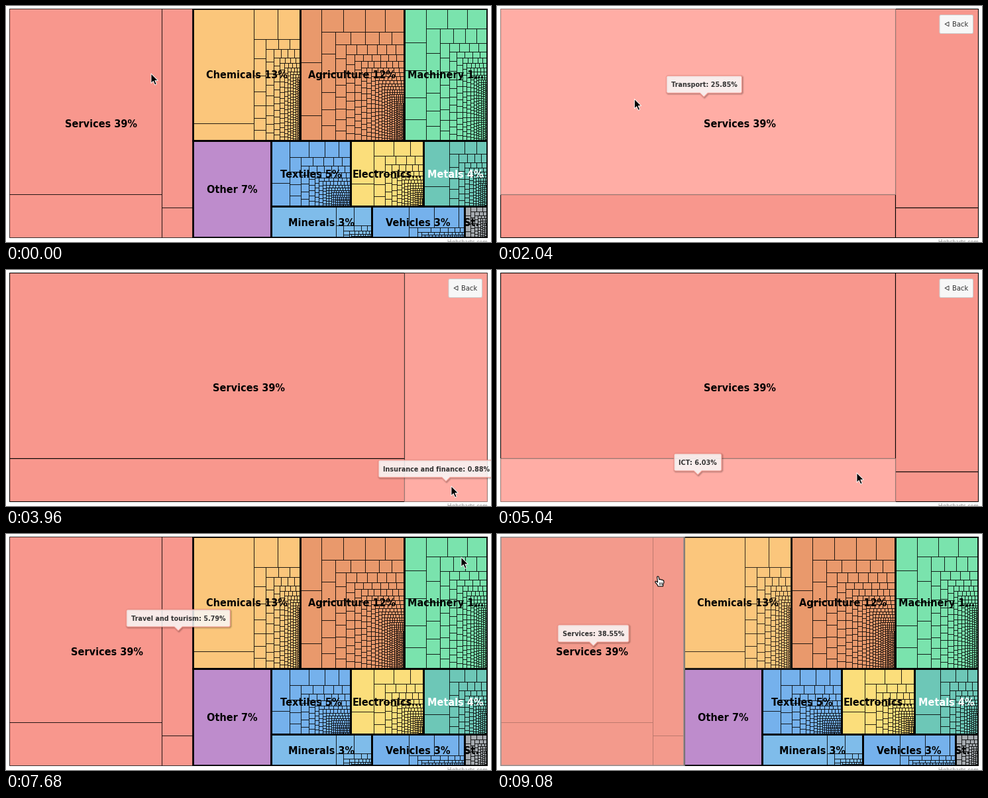
A matplotlib script that plays this animation: 732 px wide and 356 px high, repeating every 9120 ms.

```python
import matplotlib.pyplot as plt
from matplotlib.animation import FuncAnimation
from matplotlib.collections import PolyCollection
from matplotlib.patches import FancyBboxPatch, Polygon, Rectangle

W, H, DPI = 732, 356, 100
STEP, LOOP = 40, 9120
PX = 72 / DPI
DRILL_IN, DRILL_OUT, HOVER_START = 960, 7240, 160
FADE = 600
MIN_AREA = 6

fig = plt.figure(figsize=(W / DPI, H / DPI), dpi=DPI, facecolor="white")
ax = fig.add_axes([0, 0, 1, 1])
ax.set_xlim(0, W)
ax.set_ylim(H, 0)
ax.axis("off")
frame = Rectangle((5, 4), 722, 346, transform=ax.transData)


def rgb(r, g, b):
    return (r / 255, g / 255, b / 255)


def mix(a, b, k):
    return tuple(p + (q - p) * k for p, q in zip(a, b))


def ease(u):
    u = min(max(u, 0), 1)
    return u * u * (3 - 2 * u)


def label(x, y, text, size, color="black", weight="bold", ha="center", z=20):
    return ax.text(x, y, text, fontsize=size * PX, family="DejaVu Sans",
                   color=color, weight=weight, ha=ha, va="baseline", zorder=z)


def power_tail(first, spread):
    values = [first]
    while values[-1] > MIN_AREA:
        values.append(first * (1 + len(values) / spread) ** -1.5)
    return values


def tail_filling(area, first):
    low, high = .1, 100
    for _ in range(30):
        spread = (low + high) / 2
        if sum(power_tail(first, spread)) < area:
            low = spread
        else:
            high = spread
    values = power_tail(first, low)
    scale = area / sum(values)
    return [v * scale for v in values]


def last_ratio(strip, total, length):
    thick = total / length
    size = strip[-1] / thick
    return max(thick / size, size / thick)


def treemap(x, y, w, h, heads, first):
    """Squarified layout: strips alternate in direction and take cells until
    the latest one would get a worse aspect ratio."""
    queue = list(heads) + tail_filling(w * h - sum(heads), first)
    cells, column = [], True
    while queue:
        length = h if column else w
        strip = [queue.pop(0)]
        while queue and (last_ratio(strip, sum(strip) + queue[0], length)
                         <= last_ratio(strip, sum(strip), length)):
            strip.append(queue.pop(0))
        thick, pos = sum(strip) / length, 0
        for v in strip:
            size = v / thick
            cells.append((x, y + pos, thick, size) if column
                         else (x + pos, y, size, thick))
            pos += size
        if column:
            x, w = x + thick, w - thick
        else:
            y, h = y + thick, h - thick
        column = not column
    return cells


def corners(x, y, w, h):
    return [(x, y), (x + w, y), (x + w, y + h), (x, y + h)]


SALMON = rgb(248, 151, 141)
SALMON_HOVER = rgb(255, 173, 165)
BLUE = rgb(117, 177, 236)

# name: rectangle, colour, largest areas, first tail area, label, label y
GROUPS = {
    "Services": ((5, 4, 277, 345), SALMON, None, 0, "", 177),
    "Chemicals": ((282, 4, 162, 199), rgb(251, 198, 123),
                  (15900, 2400, 1660, 1570), 540, "Chemicals 13%", 103),
    "Agriculture": ((444, 4, 157, 199), rgb(233, 153, 108),
                    (2640, 2600, 1220, 1150, 1150, 1030, 1020), 680,
                    "Agriculture 12%", 103),
    "Machinery": ((601, 4, 125, 199), rgb(122, 227, 173),
                  (1680, 1430, 1350, 1100, 1060, 950, 930, 910), 760,
                  "Machinery 1…", 103),
    "Other": ((282, 203, 118, 146), rgb(190, 140, 204), None, 0,
              "Other 7%", 276),
    "Textiles": ((400, 203, 120, 99), BLUE, (1790, 960), 720,
                 "Textiles 5%", 253),
    "Electronics": ((520, 203, 110, 99), rgb(251, 222, 123),
                    (2270, 1165), 700, "Electronics…", 253),
    "Metals": ((630, 203, 96, 99), rgb(109, 199, 183), (2740, 1170),
               450, "Metals 4%", 253),
    "Minerals": ((400, 302, 152, 47), rgb(127, 188, 234),
                 (4600, 790, 770), 200, "Minerals 3%", 326),
    "Vehicles": ((552, 302, 140, 47), BLUE, (2650, 1200, 1150), 300,
                 "Vehicles 3%", 326),
    "Stone": ((692, 302, 34, 47), rgb(165, 170, 175), (), 130,
              "St.", 326),
}
SERVICE_CELLS = [(5, 4, 230, 280), (5, 284, 230, 65),
                 (235, 4, 47, 300), (235, 304, 47, 45)]

# Overview
polys, fills, overview, overlays = [], [], [], {}
for name, (rect, color, heads, first, text, ty) in GROUPS.items():
    if name == "Services":
        cells = SERVICE_CELLS
    else:
        cells = [rect] if heads is None else treemap(*rect, heads, first)
    polys += [corners(*c) for c in cells]
    fills += [color] * len(cells)
    x, y, w, h = rect
    if name != "Services":
        border = ax.add_patch(Rectangle((x, y), w, h, fill=False, ec="black",
                                        lw=2.7 * PX, zorder=3))
        border.set_clip_path(frame)
        tx = 703 if name == "Stone" else x + w / 2
        overview += [border, label(tx, ty + 6.2, text, 14.5,
                                   "white" if name == "Metals" else "black")]
    glow = rgb(242, 156, 140) if name == "Services" else mix(color, (1, 1, 1), .1)
    overlay = ax.add_patch(Rectangle((x, y), w, h, fc=glow, ec=rgb(153, 153, 153),
                                     lw=2.7 * PX, zorder=4))
    overlay.set_clip_path(frame)
    overlays[name] = overlay
small_cells = ax.add_collection(PolyCollection(
    polys, facecolors=fills, edgecolors=(0, 0, 0, .8), linewidths=.95 * PX, zorder=2))
small_cells.set_clip_path(frame)
overview.append(small_cells)

# Drilled view
DETAIL = {
    "Transport": (5, 4, 596, 280),
    "ICT": (5, 284, 596, 65),
    "Travel": (601, 4, 125, 300),
    "Insurance": (601, 304, 125, 45),
}
detail = {}
for name, (x, y, w, h) in DETAIL.items():
    detail[name] = ax.add_patch(Rectangle((x, y), w, h, lw=1.1 * PX))
    detail[name].set_clip_path(frame)
button = [
    ax.add_patch(FancyBboxPatch((669.5, 15), 47.5, 25, boxstyle="round,pad=1.5,rounding_size=2",
                                fc=rgb(247, 247, 247), ec=rgb(205, 205, 205),
                                lw=PX, zorder=22)),
    ax.add_patch(Polygon([(676, 27.3), (682, 24), (682, 30.6)], fill=False,
                         ec=rgb(51, 51, 51), lw=.9 * PX, zorder=23)),
    label(686.5, 31, "Back", 10, rgb(51, 51, 51), "normal", "left", 23),
]
services_label = label(143.5, 183.2, "Services 39%", 14.5)
label(727, 359, "Highcharts.com", 7.9, rgb(144, 144, 144), "normal", "right")

# Tooltip
TIPS = {
    "Services": "Services: 38.55%", "Transport": "Transport: 25.85%",
    "Travel": "Travel and tourism: 5.79%", "ICT": "ICT: 6.03%",
    "Insurance": "Insurance and finance: 0.88%",
    "Machinery": "Machinery: 10.05%", "Agriculture": "Agriculture: 12.46%",
    "Chemicals": "Chemicals: 12.83%",
}
# time, hovered area, tooltip subject, anchor
EVENTS = [
    (HOVER_START, "Services", "Services", 145, 177),
    (DRILL_IN, None, "Services", 366, 177),
    (1920, "Transport", "Transport", 303, 144),
    (2555, "Travel", "Travel", 664, 154),
    (3640, "Insurance", "Insurance", 664, 327),
    (4373, "ICT", "ICT", 303, 317),
    (5570, "Transport", "Transport", 303, 144),
    (5832, "Travel", "Travel", 664, 154),
    (DRILL_OUT, None, "Travel", 259, 154),
    (8160, "Machinery", "Machinery", 664, 103),
    (8310, "Agriculture", "Agriculture", 523, 103),
    (8444, "Chemicals", "Chemicals", 364, 103),
    (8612, "Services", "Services", 145, 177),
]
tip_text = label(0, 0, "", 9.7, rgb(51, 51, 51), ha="left", z=33)
tip_width = {}
for name, text in TIPS.items():
    tip_text.set_text(text)
    tip_width[name] = tip_text.get_window_extent().width + 14
tip_shadows = [ax.add_patch(Polygon([(0, 0)] * 3, fill=False, ec=(0, 0, 0, a), lw=w * PX,
                                    joinstyle="round", zorder=30))
               for w, a in ((5, .05), (3, .1), (1, .15))]
tip_box = ax.add_patch(Polygon([(0, 0)] * 3, fc=rgb(249, 249, 249) + (.85,), lw=PX,
                               joinstyle="round", zorder=31))


def tip_outline(left, top, w, anchor):
    right, bottom, c = left + w, top + 26, 1.5
    a = min(max(anchor, left + 9), right - 9)
    return [(left + c, top), (right - c, top), (right, top + c), (right, bottom - c),
            (right - c, bottom), (a + 6, bottom), (a, bottom + 6), (a - 6, bottom),
            (left + c, bottom), (left, bottom - c), (left, top + c)]


def tip_state(t):
    """Chase each target: a third of the way in x, half in y, every 32 ms."""
    pos = None
    for i, (start, _, subject, ax_, ay) in enumerate(EVENTS):
        if t < start:
            break
        end = min(t, EVENTS[i + 1][0]) if i + 1 < len(EVENTS) else t
        w = tip_width[subject]
        goal = (min(ax_ - w / 2, 737 - w), ay, ax_)
        n = 1 + (end - start) / 32
        rates = ((2 / 3) ** n, .5 ** n, (2 / 3) ** n)
        pos = goal if pos is None else tuple(
            g + (p - g) * r for p, g, r in zip(pos, goal, rates))
        shown = subject
    return shown, pos


def hover_level(name, t):
    level = 0
    for i, event in enumerate(EVENTS):
        if event[1] == name and t >= event[0]:
            end = EVENTS[i + 1][0] if i + 1 < len(EVENTS) else LOOP
            level = 1 if t < end else 1 - ease((t - end) / FADE)
    return level


# Cursor
ARROW = [(0, 0), (0, 14.5), (3.3, 11.4), (5.8, 17), (8.2, 15.9), (5.8, 10.5), (10.3, 10.3)]
HAND = [(-1.6, .6), (-.4, 0), (.8, .6), (1.8, 5), (3.5, 4.4), (4.6, 5.4), (6.2, 5),
        (7.2, 6.2), (8.4, 6.2), (8.8, 9), (7.4, 12.6), (7.4, 15), (-.2, 15),
        (-1.6, 12), (-4.4, 9), (-4.2, 7.4), (-2.6, 7.6), (-.6, 9.2)]
# start, end, from, to, upward bend
MOVES = [
    (120, 440, (219, 102), (180, 138), 0),
    (1920, 2770, (180, 138), (686, 180), 0),
    (3280, 3760, (686, 180), (672, 326), 0),
    (4000, 4700, (672, 326), (543, 306), 0),
    (5440, 6377, (543, 306), (687, 35), 22),
    (8160, 8680, (687, 35), (250, 58), 0),
    (8680, LOOP, (250, 58), (243, 64), 0),
]
cursor = ax.add_patch(Polygon(ARROW, joinstyle="round", zorder=40))
finger_lines = [ax.plot([], [], color="black", lw=.8 * PX, zorder=41)[0] for _ in range(3)]


def cursor_at(t):
    x, y = MOVES[0][2]
    for start, end, a, b, bend in MOVES:
        if t >= start:
            s = ease((t - start) / (end - start))
            x, y = mix(a, b, s)
            y -= bend * 4 * s * (1 - s)
    return x, y


def draw_cursor(t):
    x, y = cursor_at(t)
    hand = HOVER_START <= t < 1920 or t >= 8160
    cursor.set_xy([(x + dx, y + dy) for dx, dy in (HAND if hand else ARROW)])
    cursor.set_facecolor("white" if hand else "black")
    cursor.set_edgecolor("black" if hand else "white")
    cursor.set_linewidth((1.1 if hand else .9) * PX)
    for line, dx in zip(finger_lines, (1.4, 3.4, 5.4)):
        line.set_visible(hand)
        line.set_data([x + dx, x + dx], [y + 9, y + 12.5])


def draw_tooltip(t):
    visible = t >= HOVER_START
    for artist in tip_shadows + [tip_box, tip_text]:
        artist.set_visible(visible)
    if not visible:
        return
    subject, (left, y, anchor) = tip_state(t)
    outline = tip_outline(left, y - 40, tip_width[subject], anchor)
    tip_box.set_xy(outline)
    color = GROUPS[subject][1] if subject in GROUPS else SALMON
    tip_box.set_edgecolor(color)
    for shadow in tip_shadows:
        shadow.set_xy([(px + 1, py + 1) for px, py in outline])
    tip_text.set_text(TIPS[subject])
    tip_text.set_position((left + 7, y - 23.2))


def update(i):
    t = i * STEP
    drilled = DRILL_IN <= t < DRILL_OUT
    for artist in overview:
        artist.set_visible(not drilled)
    for artist in button:
        artist.set_visible(drilled)
    for name, overlay in overlays.items():
        level = hover_level(name, t)
        overlay.set_visible(not drilled and level > 0)
        overlay.set_alpha(.75 * level)
    for name, cell in detail.items():
        level = hover_level(name, t)
        cell.set_visible(drilled)
        cell.set_facecolor(mix(SALMON, SALMON_HOVER, level))
        cell.set_edgecolor(mix((0, 0, 0), rgb(150, 122, 116), level))
        cell.set_zorder(5 + level)
    shift = ease((t - DRILL_IN) / 500) - ease((t - DRILL_OUT) / 500)
    services_label.set_x(143.5 + 222.5 * shift)
    draw_tooltip(t)
    draw_cursor(t)
    return []


animation = FuncAnimation(fig, update, frames=LOOP // STEP, interval=STEP,
                          repeat=True, repeat_delay=0, blit=False)
plt.show()
```
